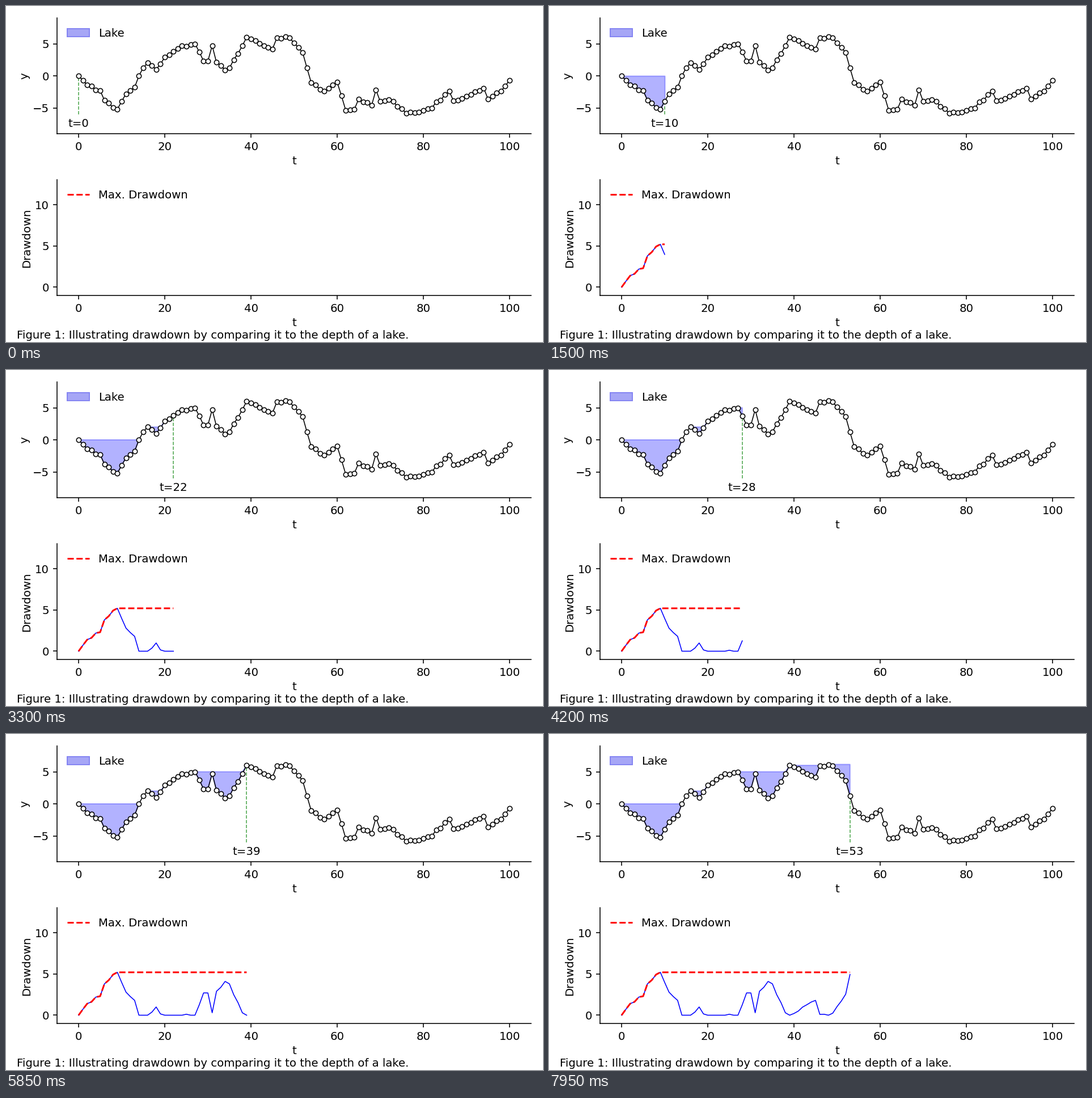
A matplotlib script for the animation above (8 s loop, 947 by 592 pixels).

```python
import numpy as np
import matplotlib.pyplot as plt
from matplotlib.animation import FuncAnimation
from matplotlib.patches import Patch

WIDTH, HEIGHT, DPI = 947, 592, 142.5
TICK_MS, STEP_MS, LOOP_MS = 50, 150, 8000

# Turning points (t, y) of the walk; small seeded noise roughens the stretches between.
TURNS = [
    (0, 0), (2, -1.4), (5, -2.3), (6, -3.8), (9, -5.2), (11, -2.8), (13, -1.8),
    (14, 0), (16, 2), (18, 1), (20, 2.9), (24, 4.7), (27, 5), (29, 2.3),
    (30, 2.3), (31, 4.7), (32, 2.1), (34, 0.9), (35, 1.2), (39, 6), (45, 4.2),
    (46, 5.9), (49, 5.9), (52, 3.6), (54, -1.1), (57, -2.4), (60, -1),
    (62, -5.4), (64, -5.2), (65, -3.6), (68, -4.6), (69, -2.2), (70, -4),
    (72, -3.7), (76, -5.8), (82, -5), (86, -2.4), (87, -3.9), (94, -1.9),
    (95, -3.6), (98, -2.4), (100, -0.7),
]
turn_t, turn_y = np.transpose(TURNS)
t = np.arange(101)
noise = np.random.default_rng(4).normal(0, 0.12, t.size)
y = np.interp(t, turn_t, turn_y) + np.where(np.isin(t, turn_t), 0, noise)
peak = np.maximum.accumulate(y)
drawdown = peak - y
max_drawdown = np.maximum.accumulate(drawdown)

plt.rcParams.update({"font.family": "DejaVu Sans", "font.size": 10})
# The small margin guards against rounding down to one pixel less.
fig = plt.figure(figsize=((WIDTH + 0.001) / DPI, (HEIGHT + 0.001) / DPI),
                 dpi=DPI, facecolor="white")


def add_panel(bottom, ylim, yticks, ylabel):
    ax = fig.add_axes([90 / WIDTH, 1 - bottom / HEIGHT,
                       836 / WIDTH, 203.5 / HEIGHT])
    ax.set(xlim=(-5, 105), ylim=ylim, yticks=yticks)
    ax.set_xlabel("t", labelpad=3)
    ax.set_ylabel(ylabel, labelpad=2.5)
    ax.spines[["top", "right"]].set_visible(False)
    return ax


path_ax = add_panel(224.8, (-9, 9), [-5, 0, 5], "y")
path_ax.plot(t, y, "o-", color="black", lw=0.8, ms=4.2, mfc="white",
             mec="black", mew=0.8, zorder=2)
marker_line, = path_ax.plot([], [], "--", color="green", lw=0.8, alpha=0.7,
                            zorder=1.5)
time_label = path_ax.text(0, -8, "", ha="center")
path_ax.legend(handles=[Patch(fc="#a6a6f6", ec="#8585f2", label="Lake")],
               loc="upper left", frameon=False)

depth_ax = add_panel(510, (-1, 13), [0, 5, 10], "Drawdown")
depth_line, = depth_ax.plot([], [], color="blue", lw=0.8)
max_line, = depth_ax.plot([], [], "--", color="red", lw=1.5,
                          label="Max. Drawdown")
depth_ax.legend(loc="upper left", frameon=False)

fig.text(19 / WIDTH, 1 - 586 / HEIGHT,
         "Figure 1: Illustrating drawdown by comparing it to the depth of a lake.")

lakes = []


def update(frame):
    now = frame * TICK_MS // STEP_MS
    seen = slice(0, now + 1)

    while lakes:
        lakes.pop().remove()
    if now:
        lakes.append(path_ax.fill_between(
            t[seen], y[seen], peak[seen], where=drawdown[seen] > 0,
            interpolate=True, color="blue", alpha=0.3, zorder=1))

    marker_line.set_data([now, now], [-6, y[now]])
    time_label.set_x(now)
    time_label.set_text(f"t={now}")
    depth_line.set_data(t[seen], drawdown[seen])
    max_line.set_data(t[seen], max_drawdown[seen])
    return [*lakes, marker_line, time_label, depth_line, max_line]


anim = FuncAnimation(fig, update, frames=LOOP_MS // TICK_MS,
                     interval=TICK_MS, repeat=True, repeat_delay=0)
plt.show()
```
